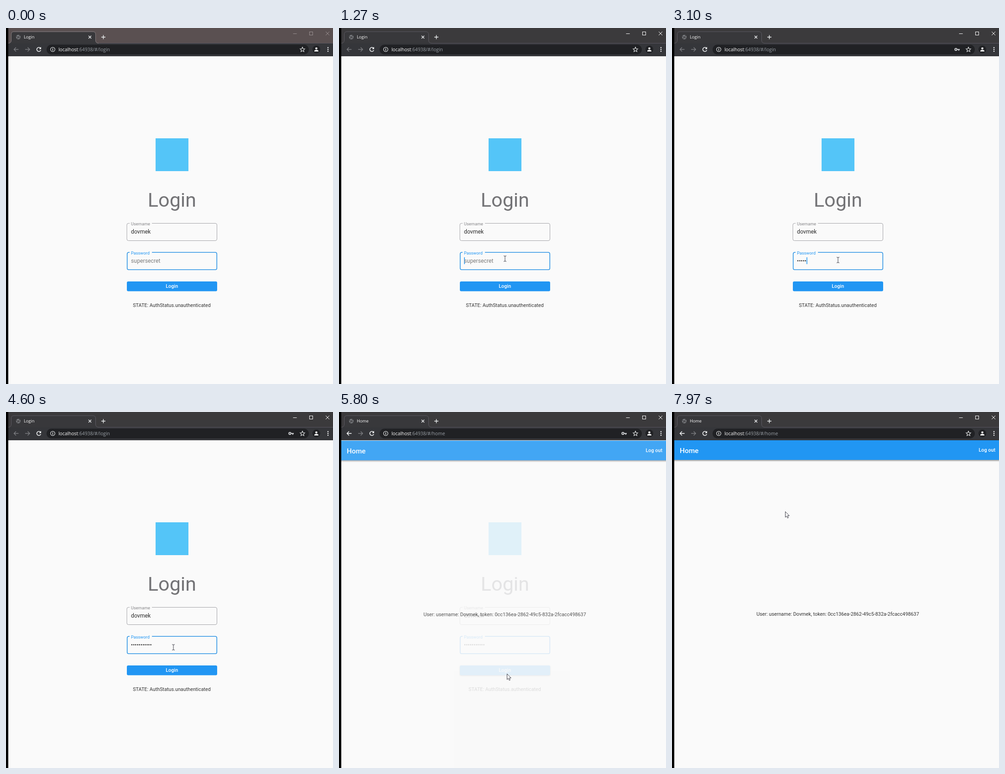
An HTML page that plays this animation: 717 px wide and 781 px high, repeating every 8 s.

```html
<!DOCTYPE html>
<html lang="en">
<head>
<meta charset="utf-8">
<title>Login</title>
<style>
html, body { margin: 0; width: 100%; height: 100%; overflow: hidden; background: #000; }
svg { display: block; width: 717px; height: 781px; }
text { font: 10.8px Roboto, sans-serif; }
.ui { font-family: "Open Sans", sans-serif; fill: #fff; }
.tab { font-size: 9.2px; }
.url { font-size: 10.3px; }
.dim { fill: #9aa0a6; }
.body { fill: #333; }
.input { font-size: 12.3px; fill: #2c2c2c; }
.label { font-size: 9.25px; }
.medium { font-weight: 500; fill: #fff; }
.mid { text-anchor: middle; }
.line { fill: none; stroke: #f1f3f4; stroke-width: 1.4; }
.thin { stroke-width: 1.1; }

/* 1% = 80 ms; hard switches use step-end */
.switch { animation: 8s step-end infinite; }
.idle { animation-name: idle; }
.login { animation-name: login; }
.home { animation-name: home; }
.empty { animation-name: empty; }
.key { animation-name: key; }
.pill { animation-name: pill; }
.hover { animation-name: hover; }
.blink { animation-name: blink; }
.arrow { animation-name: arrow; }
.ibeam { animation-name: ibeam; }
.hand { animation-name: hand; }
@keyframes idle { 0% { opacity: 1 } 5.4%, 100% { opacity: 0 } }
@keyframes login { 0% { opacity: 1 } 68.8%, 100% { opacity: 0 } }
@keyframes home { 0% { opacity: 0 } 68.8%, 100% { opacity: 1 } }
@keyframes empty { 0% { opacity: 1 } 30%, 100% { opacity: 0 } }
@keyframes key { 0% { opacity: 0 } 30% { opacity: 1 } 87.5%, 100% { opacity: 0 } }
@keyframes pill { 0% { opacity: 0 } 76% { opacity: 1 } 85%, 100% { opacity: 0 } }
@keyframes hover { 0% { opacity: 0 } 60.75%, 100% { opacity: 1 } }
@keyframes blink {
  0%, 11.6%, 21.25%, 56.25%, 68.75%, 100% { opacity: 0 }
  5.4%, 15%, 27.5%, 62.5% { opacity: 1 }
}
@keyframes arrow { 0%, 58.7%, 69.06%, 100% { opacity: 1 } 14.1%, 60.75% { opacity: 0 } }
@keyframes ibeam { 0%, 58.7%, 100% { opacity: 0 } 14.1% { opacity: 1 } }
@keyframes hand { 0%, 69.06%, 100% { opacity: 0 } 60.75% { opacity: 1 } }

.press { animation: press 8s linear infinite; }
@keyframes press {
  0%, 60.75% { opacity: 0 }
  61.3%, 67.5% { opacity: .08 }
  68.75%, 100% { opacity: .29 }
}
.typing { animation: typing 8s linear infinite; }
@keyframes typing {
  0% { transform: none }
  30% { transform: none; animation-timing-function: steps(11, start) }
  52%, 100% { transform: translateX(45.6px) }
}
.page { animation: slide 8s cubic-bezier(.4, 0, .2, 1) infinite, fade 8s cubic-bezier(.42, 0, 1, 1) infinite; }
@keyframes slide { 0%, 69.11% { transform: translateY(180px) } 72.86%, 100% { transform: none } }
@keyframes fade { 0%, 69.11% { opacity: 0 } 72.86%, 100% { opacity: 1 } }

.pointer { animation: move 8s linear infinite; }
@keyframes move {
  0%, 8.8% { transform: translate(470px, 800px) }
  10.9% { transform: translate(440px, 672px); animation-timing-function: ease-out }
  15%, 32% { transform: translate(364px, 506px) }
  37.5%, 53% { transform: translate(364px, 509px) }
  57.5% { transform: translate(367px, 516px) }
  62% { transform: translate(369px, 570px) }
  66%, 74.4% { transform: translate(368px, 574px); animation-timing-function: ease-in-out }
  82.88% { transform: translate(590px, 368px) }
  84.1% { transform: translate(585px, 338px) }
  94.4% { transform: translate(560px, 330px); animation-timing-function: ease-in-out }
  99.4%, 100% { transform: translate(248px, 218px) }
}
</style>
</head>
<body>
<svg viewBox="0 0 717 781">
  <defs>
    <clipPath id="view"><path d="M5 62H717V781H5z"/></clipPath>
    <filter id="soft" x="-10%" y="-50%" width="120%" height="200%"><feGaussianBlur stdDeviation="1.4"/></filter>
    <path id="tab" d="M5 33.5Q11.5 33 11.5 27V14Q11.5 8 17.5 8H190Q196.5 8 196.5 14V27Q196.5 33 203 33.5"/>
    <g id="controls" fill="none">
      <path d="M629.5 12.5H637.5M701 8L709 16M709 8L701 16"/>
      <rect x="665.5" y="8.5" width="7" height="7"/>
    </g>
  </defs>

  <!-- Browser frame -->
  <rect width="717" height="781"/>
  <rect x="5" width="712" height="62" fill="#3b3a3c"/>
  <use href="#controls" stroke="#fff"/>
  <g class="switch idle">
    <rect x="5" width="712" height="33" fill="#5a5051"/>
    <use href="#controls" stroke="#999091"/>
  </g>
  <path d="M5 33H717V62H5z" fill="#35363a"/>
  <use href="#tab" fill="#38383b" stroke="#5c5a62"/>
  <path d="M203 33.5H717" stroke="#57555f"/>
  <use class="switch idle" href="#tab" fill="none" stroke="#857d7e"/>
  <circle cx="27" cy="20" r="5" fill="#77797d"/>
  <path d="M23 18Q26 21 28 19T30 16M24 23Q28 20 31 22" fill="none" stroke="#3b3a3c" stroke-width="1.2"/>
  <text class="ui tab switch login" x="39" y="23.3">Login</text>
  <text class="ui tab switch home" x="39" y="23.3">Home</text>
  <path class="line" d="M181 17L187 23M187 17L181 23M209 20H218M213.5 15.5V24.5"/>

  <!-- Toolbar -->
  <g class="line">
    <path stroke="#7c7d81" d="M27.5 47H17.5M22 42.5L17.5 47L22 51.5M42 47H52M47.5 42.5L52 47L47.5 51.5"/>
    <path class="switch home" d="M27.5 47H17.5M22 42.5L17.5 47L22 51.5"/>
    <path stroke-width="1.6" d="M75.7 44.3A4.5 4.5 0 1 0 76.3 48.5"/>
    <path stroke="none" fill="#f1f3f4" d="M77 41.5V46.2H72.3z"/>
  </g>
  <rect x="89" y="36.5" width="575" height="21.5" rx="10.75" fill="#202124"/>
  <circle class="line thin" cx="102.5" cy="47" r="4.8"/>
  <path class="line" d="M102.5 46.3V49.7M102.5 44.1V45.4"/>
  <text class="ui url switch login" x="115" y="50.8">localhost<tspan class="dim">:64938/#/login</tspan></text>
  <text class="ui url switch home" x="115" y="50.8">localhost<tspan class="dim">:64938/#/home</tspan></text>
  <g class="switch key">
    <rect class="switch pill" x="613" y="38" width="24" height="18" rx="9" fill="#5b5d62"/>
    <circle cx="622.5" cy="47" r="2.2" fill="none" stroke="#c8cacd" stroke-width="2"/>
    <path d="M625 47H631M628.8 47V50" fill="none" stroke="#c8cacd" stroke-width="2"/>
  </g>
  <path class="line thin" d="M650 42L651.5 45.5L655.2 45.8L652.4 48.2L653.2 51.9L650 49.9L646.8 51.9L647.6 48.2L644.8 45.8L648.5 45.5z"/>
  <circle cx="680.5" cy="47" r="8.5" fill="#202124"/>
  <path d="M676 51.5V50.5Q676 48 680.5 48T685 50.5V51.5z" fill="#fff"/>
  <circle cx="680.5" cy="44.7" r="2.3" fill="#fff"/>
  <g fill="#f1f3f4"><circle cx="706" cy="43" r="1.3"/><circle cx="706" cy="47" r="1.3"/><circle cx="706" cy="51" r="1.3"/></g>

  <!-- Login page -->
  <g clip-path="url(#view)">
    <rect x="5" y="62" width="712" height="719" fill="#fafafa"/>
    <rect x="328" y="242" width="72" height="72" fill="#54c5f8"/>
    <text class="mid" x="364" y="392" style="font-size:43.1px" fill="#737376">Login</text>

    <path d="M320 428.5H459Q462.5 428.5 462.5 432V463Q462.5 466.5 459 466.5H268.5Q265 466.5 265 463V432Q265 428.5 268.5 428.5H271" fill="none" stroke="#a2a2a7"/>
    <text class="label" x="274" y="433" fill="#858588">Username</text>
    <text class="input" x="274" y="451">dovmek</text>

    <text class="input" x="274" y="515">•••••••••••</text>
    <g class="typing">
      <rect x="274" y="501" width="48" height="20" fill="#fafafa"/>
      <rect class="switch blink" x="274.3" y="503" width="1.6" height="15" fill="#2196f3"/>
    </g>
    <text class="input switch empty" x="274" y="515" style="fill:#7b7b7b">supersecret</text>
    <path d="M320 492.3H459Q462.3 492.3 462.3 496V527Q462.3 530.3 459 530.3H269Q265.7 530.3 265.7 527V496Q265.7 492.3 269 492.3H271" fill="none" stroke="#2a92e4" stroke-width="1.6"/>
    <text class="label" x="274" y="497" fill="#2196f3">Password</text>

    <rect class="switch hover" x="265" y="557.5" width="198" height="21" rx="3" fill="#0007" filter="url(#soft)"/>
    <rect x="265" y="556" width="198" height="21.5" rx="3" fill="#2196f3"/>
    <rect class="press" x="265" y="556" width="198" height="21.5" rx="3" fill="#fff"/>
    <text class="medium mid" x="363.7" y="570.3">Login</text>
    <text class="body mid switch login" x="363.5" y="611.8">STATE: AuthStatus.unauthenticated</text>
    <text class="body mid switch home" x="363.5" y="611.8">STATE: AuthStatus.authenticated</text>

    <!-- Home page -->
    <g class="page">
      <rect x="5" y="62" width="712" height="719" fill="#fafafa"/>
      <rect x="3" y="64" width="716" height="43" fill="#0006" filter="url(#soft)"/>
      <rect x="5" y="62" width="712" height="43" fill="#2196f3"/>
      <text class="medium" x="17" y="89.5" style="font-size:15.4px">Home</text>
      <text class="medium" x="672.5" y="87.2">Log out</text>
      <text class="body mid" x="363.5" y="446.8">User: username: Dovmek, token: 0cc136ea-2862-49c5-832a-2fcacc498637</text>
    </g>
  </g>

  <!-- Mouse pointer -->
  <g class="pointer" fill="#fff" stroke="#3c3c46">
    <path class="switch arrow" d="M.5 .5V13L3.3 10.3L5.3 14.8L7.3 13.9L5.4 9.5H9.2z"/>
    <path class="switch ibeam" fill="none" d="M-3 -6H-1L0 -5L1 -6H3M0 -5V5M-3 6H-1L0 5L1 6H3"/>
    <path class="switch hand" d="M-1.5 9V1Q0 -1 1.5 1V5.5Q3 4.5 4 6Q5.5 5 6.5 6.5Q8.5 6 8.5 8V11L7 15H-.5L-4.5 9.5Q-4 7.5 -1.5 9z"/>
  </g>
</svg>
</body>
</html>
```
